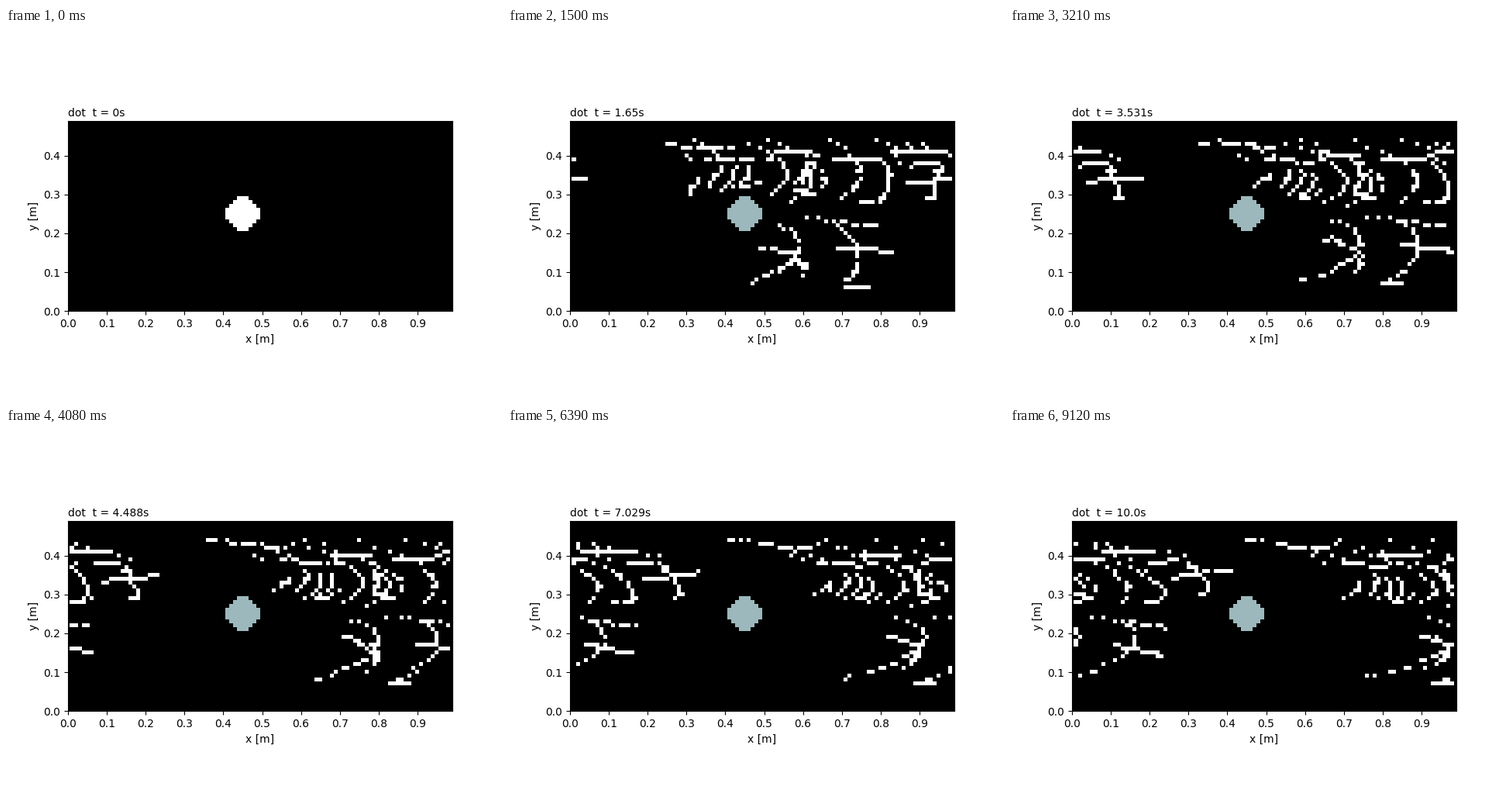
A matplotlib script for the animation above (9.15 s loop, 640 px wide and 480 px high).

```python
import numpy as np
import matplotlib.pyplot as plt
from matplotlib.animation import FuncAnimation
from matplotlib.path import Path
from matplotlib.textpath import TextPath

FRAMES, INTERVAL, DT = 305, 30, 0.033
NX, NY = 100, 50
PERIOD = 98                # fluid cells 1..98 repeat in x
CX, CY = 45, 25            # cylinder centre
MID, HALF = 24, 24         # channel centre line and half height
U0, DECAY = 16.0, 4.9      # cells per second, seconds
BODY, REACH = 5.0, 40.0
FINE = 4                   # sub-cells used to rasterise the lettering
RING = [(1, 0), (1, -1), (0, -1), (-1, -1), (-1, 0), (-1, 1), (0, 1), (1, 1)]


def thin(mask):
    """Zhang-Suen thinning down to lines one cell wide."""
    m = mask.astype(int)
    while True:
        before = m.sum()
        for first in (True, False):
            ring = [np.roll(m, s, (0, 1)) for s in RING]
            n, e, s, w = ring[::2]
            count = sum(ring)
            turns = sum((1 - a) * b for a, b in zip(ring, ring[1:] + ring[:1]))
            keep = n * e * s + e * s * w if first else n * e * w + n * s * w
            drop = (count >= 2) & (count <= 6) & (turns == 1) & (keep == 0)
            m = np.where(drop, 0, m)
        if m.sum() == before:
            return m.astype(bool)


def lettering(text, size, x, y):
    """Mask of thin strokes for a line of text centred on cell (x, y)."""
    path = TextPath((0, 0), text, size=size, prop={"family": "Noto Sans CJK JP"})
    box = path.get_extents()
    shift = np.array([x - (box.x0 + box.x1) / 2, y - (box.y0 + box.y1) / 2])
    gy, gx = (np.mgrid[:NY * FINE, :NX * FINE] + 0.5) / FINE - 0.5
    pts = np.column_stack([gx.ravel(), gy.ravel()])
    ink = np.zeros(len(pts), bool)
    for poly in path.to_polygons():
        ink ^= Path(poly + shift).contains_points(pts)
    lines = thin(ink.reshape(gx.shape))
    return thin(lines.reshape(NY, FINE, NX, FINE).any(axis=(1, 3)))


def velocity(pos, t):
    """Decaying channel flow bent around the cylinder, from a stream function."""
    x, y = pos.T
    dx = (x - CX + PERIOD / 2) % PERIOD - PERIOD / 2
    dy, eta = y - CY, y - MID
    r = np.maximum(np.hypot(dx, dy), 1)
    s = np.clip(np.abs(eta) / HALF, 0, 1)
    n = 1.7 + 4 * np.exp(-t / 0.7)   # blunt at first, then rounded

    profile = 1 - s ** n
    psi = eta * (1 - s ** n / (n + 1)) - (CY - MID)
    g = np.minimum(BODY / r * np.exp(-(r / REACH) ** 2), 1)
    slope = -g * (1 / r + 2 * r / REACH ** 2) / r
    wall = (1 - s ** 2) ** 2
    wall_slope = -4 * (1 - s ** 2) * eta / HALF ** 2

    u = profile * (1 - g * wall) - psi * (slope * dy * wall + g * wall_slope)
    v = psi * wall * slope * dx
    return U0 * np.exp(-t / DECAY) * np.column_stack([u, v])


def advance(pos, t):
    mid = pos + velocity(pos, t) * DT / 2
    return pos + velocity(mid, t + DT / 2) * DT


rows, cols = np.mgrid[:NY, :NX]
dist2 = (cols - CX) ** 2 + (rows - CY) ** 2
disc = dist2 <= 17

ink = lettering("流体力学", 18.6, 45.5, 36.6) | lettering("メモ", 22.5, 42.7, 14)
ink &= dist2 > BODY ** 2
path = [np.argwhere(ink)[:, ::-1].astype(float)]
for k in range(1, FRAMES):
    path.append(advance(path[-1], (k - 1) * DT))


def field(k):
    grid = np.zeros((NY, NX))
    if k == 0:
        grid[disc] = 1
        return grid
    cell = np.floor(path[k] + 0.5).astype(int)
    grid[np.clip(cell[:, 1], 1, NY - 2), 1 + (cell[:, 0] - 1) % PERIOD] = 1
    grid[disc] = 0.7
    return grid


def caption(k):
    t = min(round(k * DT, 3), 10.0) if k else 0
    return f"dot  t = {t}s"


fig, ax = plt.subplots(figsize=(6.4, 4.8), dpi=100)
image = ax.imshow(field(0), origin="lower", cmap="bone", vmin=0, vmax=1,
                  interpolation="nearest", extent=(-0.005, 0.995, -0.005, 0.495))
ax.set(xlim=(0, 0.99), ylim=(0, 0.49), xlabel="x [m]", ylabel="y [m]",
       xticks=np.arange(10) / 10, yticks=np.arange(5) / 10)
label = ax.text(0, 0.502, caption(0))


def update(k):
    image.set_data(field(k))
    label.set_text(caption(k))
    return image, label


anim = FuncAnimation(fig, update, frames=FRAMES, interval=INTERVAL, repeat=True)
plt.show()
```
